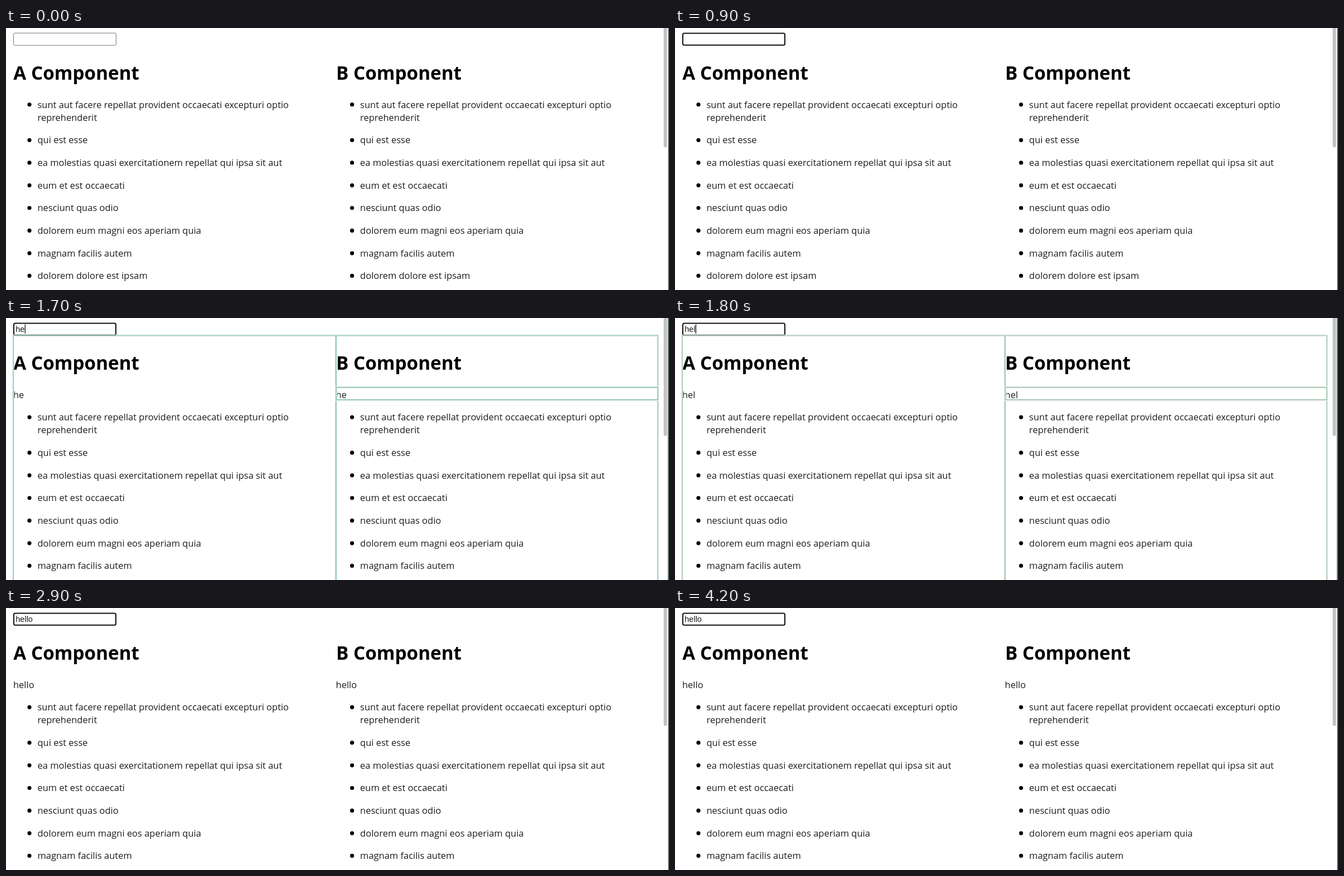
These frames come from a looping animation (1189x471 px, 4.5 s). An HTML page:

```html
<!DOCTYPE html>
<html lang="en">
<head>
<meta charset="utf-8">
<title>Typing re-render</title>
<style>
  html, body { margin: 0; width: 100%; height: 100%; overflow: hidden; background: #fff; }
  svg { display: block; width: 1189px; height: 471px; }
  text { font: 16.48px "Open Sans", "Noto Sans", sans-serif; fill: #1c1c1c; }
  .title { font-size: 33.3px; font-weight: 700; fill: #000; }
  #typed { font: 14.5px "Liberation Sans", Arial, sans-serif; }
  .outline rect { fill: none; }
  .halo { stroke: #f4f4f4; stroke-width: 4; }
  .line { stroke: var(--hue); stroke-width: 2; opacity: .58; }
  .strong { stroke-width: 1.7; opacity: .74; }
</style>
</head>
<body>
<svg viewBox="0 0 1189 471">
  <rect id="field" fill="#fff"/>
  <text id="typed" x="17.3" y="24.6"></text>
  <rect id="caret" y="11.5" width="1.2" height="16.5"/>
  <g id="columns"></g>
  <rect id="thumb" x="1179.5" y="-8" width="6" rx="3" fill="#c1c1c1"/>
  <g id="outlines" class="outline"></g>
  <rect x="1187.7" width="1.3" height="471" fill="#444"/>
</svg>
<script>
const LOOP = 4500, ROW = 40.65, LEAD = 23.2;
const TITLES = ["A Component", "B Component"];
const POSTS = [
  "sunt aut facere repellat provident occaecati excepturi optio|reprehenderit",
  "qui est esse",
  "ea molestias quasi exercitationem repellat qui ipsa sit aut",
  "eum et est occaecati",
  "nesciunt quas odio",
  "dolorem eum magni eos aperiam quia",
  "magnam facilis autem",
  "dolorem dolore est ipsam"
];
const HUES = ["#37afa9", "#63b19e", "#80b393", "#97b488", "#abb67d"];
const KEYS = [1400, 1700, 1800, 2000, 2300];   // one keystroke each
const BLINKS = [300, 900, 1400, 2900, 3600, 4200];   // caret on, off, on, ...

const $ = id => document.getElementById(id);
const set = (el, attrs) => {
  for (const name in attrs) el.setAttribute(name, attrs[name]);
};

function column(title, x) {
  let y = 143.5, list = "";
  for (const post of POSTS) {
    list += `<circle cx="${x + 29}" cy="${y - 5.8}" r="3.6"/>`;
    post.split("|").forEach((line, i) => {
      if (i) y += LEAD;
      list += `<text x="${x + 43.5}" y="${y}">${line}</text>`;
    });
    y += ROW;
  }
  return `<text class="title" x="${x + .3}" y="92.7">${title}</text>
    <text class="echo" x="${x}" y="143.5"></text><g class="list">${list}</g>`;
}

function outline(x, y, w, h, kind = "") {
  const box = `x="${x}" y="${y}" width="${w}" height="${h}"`;
  return `<rect class="halo" ${box} opacity="${kind ? 1 : .6}"/><rect class="line ${kind}" ${box}/>`;
}

$("columns").innerHTML = TITLES.map((title, i) => column(title, 13 + 578.6 * i)).join("");
$("outlines").innerHTML =
  outline(13, 31.5, 578, 500) +
  outline(592, 31.5, 577, 500) +
  outline(592, 124.7, 577, 22.4, "strong") +
  `<rect class="line" x="1187.3" y="-5" width="9" height="500"/>`;

const echoes = document.querySelectorAll(".echo");
const lists = document.querySelectorAll(".list");

function draw(t) {
  const passed = times => times.filter(at => t >= at).length;
  const count = passed(KEYS);
  const word = "hello".slice(0, count);
  const focus = t >= 300;
  const edge = focus ? 2 : 1;

  set($("field"), {
    x: 13 + edge / 2, y: 8.6 + edge / 2, width: 185 - edge, height: 23.2 - edge,
    rx: 2.5, stroke: focus ? "#101010" : "#767676", "stroke-width": edge
  });
  $("typed").textContent = word;
  set($("caret"), {
    x: 17.5 + (count ? $("typed").getComputedTextLength() : 0),
    opacity: passed(BLINKS) % 2
  });
  echoes.forEach(el => el.textContent = word);
  lists.forEach(el => set(el, { transform: `translate(0 ${count ? ROW : 0})` }));
  set($("thumb"), { height: count ? 220 : 222.5 });

  const lit = count && t < 2900;
  $("outlines").style.display = lit ? "" : "none";
  if (lit) $("outlines").style.setProperty("--hue", HUES[count - 1]);
}

const start = performance.now();
function tick() {
  draw((performance.now() - start) % LOOP);
  requestAnimationFrame(tick);
}
tick();
</script>
</body>
</html>
```
